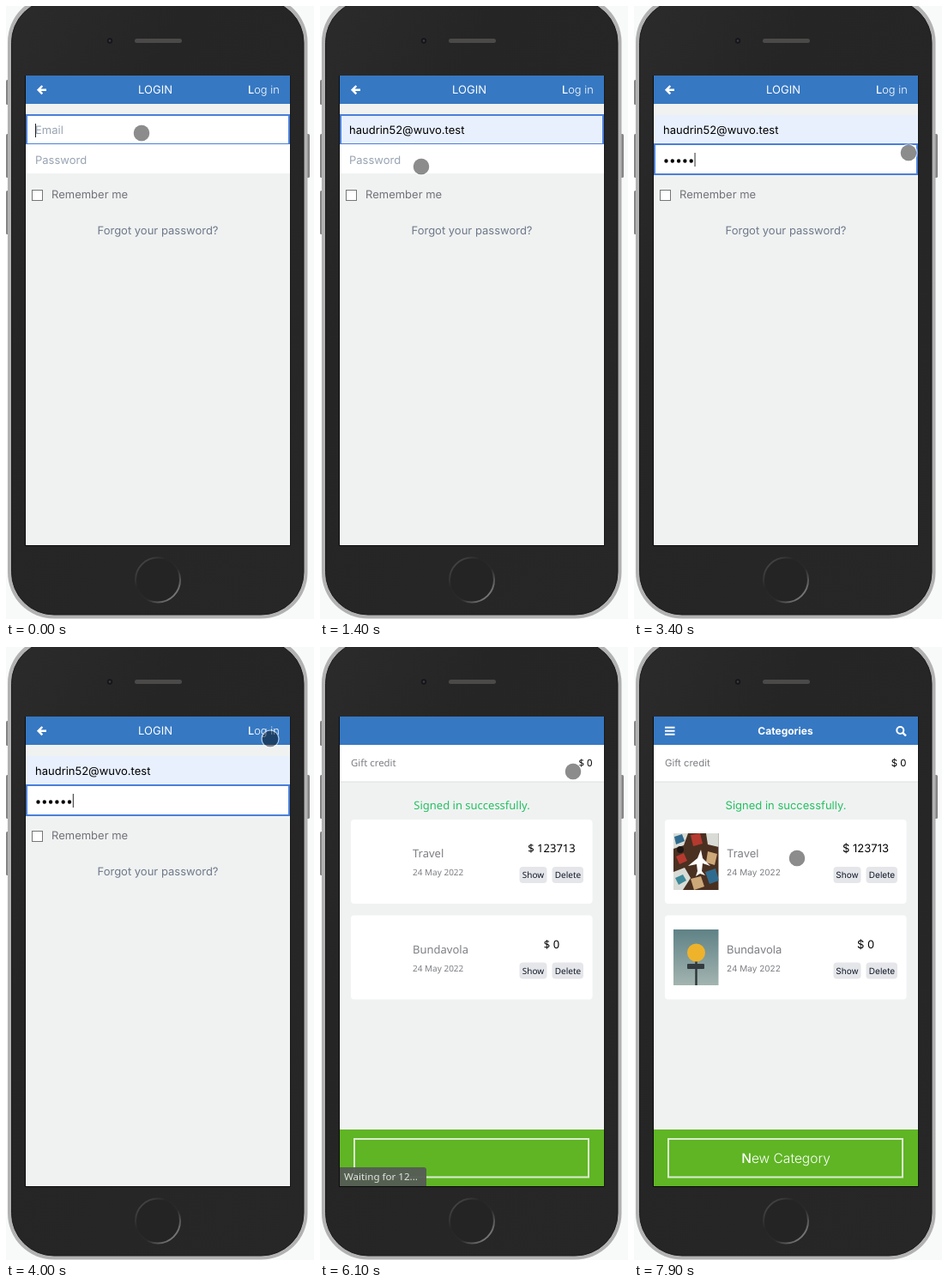
Write an HTML page that moves like this. It is 359x714 px and loops after 8 s.

```html
<!DOCTYPE html>
<html lang="en">
<head>
<meta charset="utf-8">
<title>Login walkthrough</title>
<style>
  html, body { margin: 0; width: 100%; height: 100%; overflow: hidden; background: #f8f9f9; }
  svg { display: block; width: 359px; height: 714px; font: 13px Inter, sans-serif; }
  text { white-space: pre; text-rendering: geometricPrecision; }
  .native, .native text { text-rendering: auto; }
  .mid { text-anchor: middle; }
  .end { text-anchor: end; }
  .hint { fill: #98a4b2; }
  .muted { fill: #7d7f84; }
  .white { fill: #fff; }
  .small { font-size: 10px; }
  .noto { font-family: "Noto Sans", sans-serif; }
  .initial { font-weight: 500; }

  /* Every part shares one 8 s clock and holds its pose until the next key. */
  .key { animation: 8s -5ms step-end infinite; }

  .hint-email { animation-name: hint-email; }
  @keyframes hint-email { 0% { opacity: 1 } 11.25%, 100% { opacity: 0 } }
  .email-caret { animation-name: email-caret; }
  @keyframes email-caret { 0% { opacity: 1 } 3.75%, 100% { opacity: 0 } }
  .filled { animation-name: filled; }
  @keyframes filled { 0% { opacity: 0 } 11.25%, 100% { opacity: 1 } }
  .preview { animation-name: preview; }
  @keyframes preview { 0% { opacity: 0 } 11.25% { opacity: 1 } 13.75%, 100% { opacity: 0 } }
  .chosen { animation-name: chosen; }
  @keyframes chosen { 0% { opacity: 0 } 13.75%, 100% { opacity: 1 } }
  .email-focus { animation-name: email-focus; }
  @keyframes email-focus { 0% { opacity: 1 } 22.5%, 100% { opacity: 0 } }
  .pass-focus { animation-name: pass-focus; }
  @keyframes pass-focus { 0% { opacity: 0 } 22.5% { opacity: 1 } 57.5%, 100% { opacity: 0 } }
  .hint-pass { animation-name: hint-pass; }
  @keyframes hint-pass { 0% { opacity: 1 } 27.5%, 100% { opacity: 0 } }
  .typing { animation-name: typing; }
  @keyframes typing {
    0% { transform: none }
    27.5% { transform: translateX(7.3px) }
    28.75% { transform: translateX(14.6px) }
    30% { transform: translateX(21.9px) }
    38.75% { transform: translateX(29.2px) }
    42.5% { transform: translateX(36.5px) }
    46.25%, 100% { transform: translateX(43.8px) }
  }
  .pass-caret { animation-name: pass-caret; }
  @keyframes pass-caret { 0% { opacity: 0 } 22.5% { opacity: 1 } 55%, 100% { opacity: 0 } }

  .submit { font-weight: 300; animation-name: submit; }
  @keyframes submit {
    0% { font-size: 12.8px; transform: none }
    57.5%, 100% { font-size: 13.6px; transform: translate(-.8px, -3px) }
  }

  .menu { filter: drop-shadow(0 1px 1.5px #0006); animation-name: menu; }
  @keyframes menu { 0% { opacity: 0 } 3.75% { opacity: 1 } 13.75%, 100% { opacity: 0 } }
  .arrow { animation-name: arrow; }
  @keyframes arrow {
    0% { opacity: 0; transform: translate(140px, 165px) }
    3.75% { opacity: 1; transform: translate(140px, 165px) }
    5% { opacity: 1; transform: translate(113px, 194px) }
    11.25% { opacity: 1; transform: translate(108px, 208px) }
    13.75%, 100% { opacity: 0; transform: translate(108px, 208px) }
  }
  .touch { animation-name: touch; }
  @keyframes touch {
    0% { transform: translate(158px, 148px) }
    13.75% { transform: translate(109px, 215px) }
    15% { transform: translate(111px, 211px) }
    16.25% { transform: translate(114px, 202px) }
    17.5% { transform: translate(118px, 187px) }
    20% { transform: translate(122px, 183px) }
    21.25% { transform: translate(126px, 181px) }
    22.5% { transform: translate(129px, 180px) }
    31.25% { transform: translate(150px, 177px) }
    32.5% { transform: translate(230px, 173px) }
    33.75% { transform: translate(320px, 171px) }
    43.75% { transform: translate(320px, 163px) }
    45% { transform: translate(318px, 152px) }
    46.25% { transform: translate(315px, 138px) }
    47.5% { transform: translate(312px, 125px) }
    48.75% { transform: translate(309px, 114px) }
    50% { transform: translate(308px, 107px) }
    51.25% { transform: translate(313px, 100px) }
    52.5% { transform: translate(316px, 98px) }
    62.5% { transform: translate(313px, 122px) }
    70% { transform: translate(299px, 138px) }
    76.25% { transform: translate(295px, 145px) }
    80% { transform: translate(270px, 181px) }
    85% { transform: translate(243px, 207px) }
    95% { transform: translate(228px, 218px) }
    96.25% { transform: translate(214px, 229px) }
    97.5% { transform: translate(202px, 238px) }
    98.75%, 100% { transform: translate(190px, 246px) }
  }
  .touch-on { animation-name: touch-on; }
  @keyframes touch-on { 0% { opacity: 1 } 3.75% { opacity: 0 } 13.75%, 100% { opacity: 1 } }

  .home { animation-name: home; }
  @keyframes home { 0% { opacity: 0 } 76.25%, 100% { opacity: 1 } }
  .photo { animation-name: photo; }
  @keyframes photo { 0% { opacity: 0 } 80%, 100% { opacity: 1 } }
  .ready { animation-name: ready; }
  @keyframes ready { 0% { opacity: 0 } 91.25%, 100% { opacity: 1 } }
  .swap { animation-name: swap; }
  @keyframes swap {
    0% { font-family: "Noto Sans", sans-serif }
    91.25%, 100% { font-family: Inter, sans-serif }
  }
  .status { animation-name: status; }
  @keyframes status { 0% { opacity: .95 } 80% { opacity: .85 } 85% { opacity: .5 } 87.5%, 100% { opacity: 0 } }
</style>
</head>
<body>
<svg viewBox="0 0 359 714">
  <defs>
    <linearGradient id="shell" x2="1" y2="1">
      <stop stop-color="#2b2b2b"/><stop offset=".3" stop-color="#252525"/><stop offset="1" stop-color="#272727"/>
    </linearGradient>
    <linearGradient id="rim" x2="1" y2="1">
      <stop stop-color="#555"/><stop offset=".35" stop-color="#262626"/>
      <stop offset=".6" stop-color="#2a2a2a"/><stop offset="1" stop-color="#a0a0a0"/>
    </linearGradient>
    <linearGradient id="sky" x2="0" y2="1">
      <stop stop-color="#5f8286"/><stop offset="1" stop-color="#a3b4b0"/>
    </linearGradient>
    <clipPath id="desk"><rect x="46" y="217" width="52.5" height="66"/></clipPath>
    <g id="card">
      <rect x="36" y="201" width="281.5" height="98" rx="4" fill="#fff"/>
      <rect x="232.5" y="256" width="32" height="19" rx="4" fill="#e5e6ea"/>
      <rect x="270.5" y="256" width="36.5" height="19" rx="4" fill="#e5e6ea"/>
    </g>
  </defs>

  <!-- phone -->
  <g fill="#858585">
    <rect y="86" width="5" height="29" rx="1.5"/>
    <rect y="149" width="5" height="51" rx="1.5"/>
    <rect y="215" width="5" height="51" rx="1.5"/>
    <rect x="349" y="149" width="5" height="51" rx="1.5"/>
  </g>
  <rect x="2" y="-12" width="349.5" height="725.5" rx="54" fill="#b2b2b2"/>
  <rect x="6.5" y="-7" width="340.5" height="716" rx="49.5" fill="url(#shell)" stroke="#1c1c1c"/>
  <circle cx="121" cy="40.5" r="3.2" fill="#161618"/>
  <circle cx="121" cy="40.5" r="1.3" fill="#3a3d4d"/>
  <rect x="150" y="38" width="55" height="5" rx="2.5" fill="#4b4a49"/>
  <circle cx="177" cy="668.5" r="26" fill="#242424" stroke="url(#rim)" stroke-width="2"/>
  <rect x="22" y="81" width="309.5" height="548" fill="#0b0b0b"/>

  <!-- login page -->
  <rect x="23" y="81" width="308" height="547" fill="#f0f2f2"/>
  <rect x="23" y="81" width="308" height="33" fill="#3678c2"/>
  <path d="M42.3 93l-4.6 4.7 4.6 4.7M38 97.7h9" fill="none" stroke="#fff" stroke-width="2.5"/>
  <text class="mid white" x="174" y="102">LOGIN</text>
  <text class="key submit white" x="282" y="102"><tspan class="initial">L</tspan>og in</text>

  <rect x="23" y="127" width="308" height="34" fill="#fff"/>
  <rect class="key filled" x="23" y="127" width="308" height="34" fill="#e8f0fe"/>
  <text class="key hint hint-email" x="34" y="149">Email</text>
  <path class="key email-caret" d="M34.5 137v16" stroke="#222"/>
  <text class="key native preview" x="34" y="149" style="font:11px 'Liberation Sans', sans-serif">haudrin52@wuvo.test</text>
  <text class="key chosen" x="34" y="149">haudrin52@wuvo.test</text>
  <rect class="key email-focus" x="24" y="127" width="306" height="34" fill="none" stroke="#4a7fd8" stroke-width="2"/>

  <rect x="23" y="161" width="308" height="34" fill="#fff"/>
  <path d="M37.5 180.5h37" stroke="#000" stroke-width="4.4" stroke-linecap="round" stroke-dasharray="0 7.3"/>
  <g class="key typing">
    <rect x="34" y="172" width="60" height="16" fill="#fff"/>
    <path class="key pass-caret" d="M34.6 171v16" stroke="#222"/>
  </g>
  <text class="key hint hint-pass" x="34" y="184">Password</text>
  <rect class="key pass-focus" x="24" y="161" width="306" height="35" fill="none" stroke="#4a7fd8" stroke-width="2"/>

  <rect x="30.5" y="214.5" width="12" height="12" fill="#fff" stroke="#767676"/>
  <text x="53" y="224" fill="#717378">Remember me</text>
  <text class="mid" x="177" y="266" fill="#6e7888">Forgot your password?</text>

  <!-- suggestions -->
  <g class="key native menu noto" font-size="12.8" fill="#1f1f1f">
    <rect x="23" y="180" width="308" height="232" rx="2" fill="#fff"/>
    <rect class="key filled" x="23" y="188" width="308" height="36" fill="#e8e8e8"/>
    <text x="35" y="210">haudrin52@wuvo.test</text>
    <text x="35" y="246">pim@wuvo.test</text>
    <text x="35" y="282">orli@wuvo.test</text>
    <text x="35" y="318">tovanek@wuvo.test</text>
    <text x="35" y="354">nilu@wuvo.test</text>
    <text x="35" y="390">emru@wuvo.test</text>
  </g>

  <!-- categories page -->
  <g class="key home">
    <rect x="23" y="81" width="308" height="547" fill="#f0f2f2"/>
    <rect x="23" y="81" width="308" height="33" fill="#3678c2"/>
    <rect x="23" y="114" width="308" height="43" fill="#fff"/>
    <path d="M23 157h308" stroke="#dfe1e1"/>
    <use href="#card"/>
    <use href="#card" y="111.5"/>
    <rect x="23" y="562" width="308" height="66" fill="#5fb524"/>
    <rect x="40" y="573" width="273" height="44.5" fill="none" stroke="#dcedcf" stroke-width="2"/>

    <g class="key swap">
      <g font-size="11.4">
        <text class="muted" x="36" y="138.7">Gift credit</text>
        <text class="end" x="317.5" y="138.7">$ 0</text>
      </g>
      <text class="mid" x="177" y="189" fill="#25c062">Signed in successfully.</text>
      <text class="muted" x="108" y="245">Travel</text>
      <text class="muted" x="108" y="357">Bundavola</text>
      <text class="mid" x="270" y="239">$ 123713</text>
      <text class="mid" x="270" y="351">$ 0</text>
      <g class="small">
        <text class="muted" x="108" y="266">24 May 2022</text>
        <text class="muted" x="108" y="378">24 May 2022</text>
        <g class="mid" fill="#111827">
          <text x="248.5" y="269">Show</text>
          <text x="289" y="269">Delete</text>
          <text x="248.5" y="380.5">Show</text>
          <text x="289" y="380.5">Delete</text>
        </g>
      </g>
    </g>

    <g class="key photo">
      <rect x="46" y="329" width="52.5" height="65" fill="url(#sky)"/>
      <path d="M72.5 364v30" stroke="#2c3436" stroke-width="2.4"/>
      <rect x="62" y="369" width="20" height="6" rx="1" fill="#343b3f"/>
      <circle cx="72.5" cy="356" r="10.5" fill="#eeb32b"/>
    </g>

    <g class="key ready">
      <g clip-path="url(#desk)">
        <rect x="46" y="217" width="53" height="66" fill="#4a3021"/>
        <path d="M46 217h17l-5 14-12 4zM84 217h15v16l-13-3zM46 262l13-5 7 12-9 14H46z" fill="#d9dcd6"/>
        <path d="M47 221l9-3 3 8-10 4zM83 262l12-4 4 14-11 4z" fill="#2f6b8f"/>
        <path d="M66 219l11-2 3 12-11 3zM49 244l9-4 4 9-9 4z" fill="#b5392f"/>
        <path d="M86 238l11 3-3 13-10-3zM66 270l12-3 4 12-12 4z" fill="#cda878"/>
        <path d="M48 269l9-4 4 7-9 5z" fill="#3e8a9b"/>
        <circle cx="54" cy="236" r="4" fill="#1d1613"/>
        <path d="M78 236l2 10 9 9-9-3-1 9 4 5-6-2-5 3 2-6-1-8-10 2 11-9z" fill="#fff"/>
      </g>
      <path d="M36 93.7h11.5M36 97.7h11.5M36 101.7h11.5" stroke="#fff" stroke-width="2"/>
      <text class="mid white" x="176.5" y="102" font-size="12" font-weight="700">Categories</text>
      <g fill="none" stroke="#fff" stroke-width="2">
        <circle cx="310.3" cy="97" r="4"/><path d="M313.2 99.9l3.8 3.6" stroke-width="2.4"/>
      </g>
      <text class="mid white" x="177" y="601" font-size="15.5" font-weight="300"><tspan class="initial">N</tspan>ew Category</text>
    </g>

    <g class="key native status noto">
      <path d="M23 606h98q3 0 3 3v19H23z" fill="#555b55"/>
      <text x="28" y="621" font-size="11.6" fill="#e4e8e2">Waiting for 12...</text>
    </g>
  </g>

  <!-- pointers -->
  <path class="key arrow" d="M.5.5v17l4-3.6 2.7 6.3 3-1.3-2.7-6.1h5.2z" fill="#fff" stroke="#111" stroke-width="1.2"/>
  <g class="key touch">
    <g class="key touch-on">
      <circle r="9.4" fill="#000" fill-opacity=".45"/>
      <circle r="10" fill="none" stroke="#fff" stroke-opacity=".6" stroke-width="1.2"/>
    </g>
  </g>
</svg>
</body>
</html>
```
